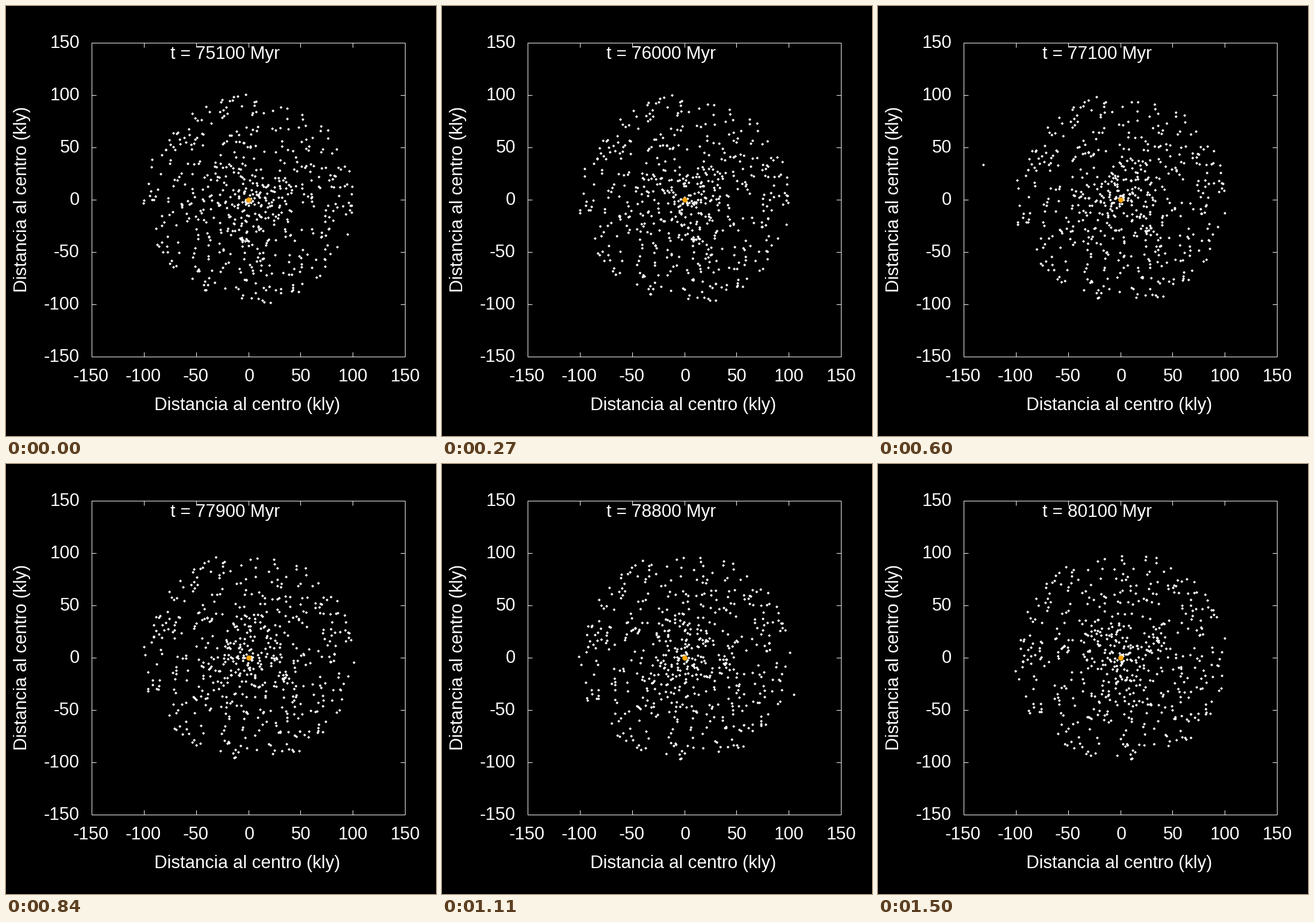
Write a matplotlib script that moves like this. It is 748 px wide and 748 px high and loops after 1530 ms.

```python
import numpy as np
import matplotlib.pyplot as plt
from matplotlib.animation import FuncAnimation

SIZE, DPI = 748, 88
PX = 72 / DPI                       # one pixel in points
LEFT, RIGHT, TOP, BOTTOM = 149, 694, 64, 610
CX, CY = 422, 337
KLY = 1.82                          # pixels per kly
FRAMES, STEP_MS = 51, 30
STARS = 570
FONT = dict(family="Liberation Sans", size=31 * PX, color="white")

# Ejected stars: first step, x and y at that step, velocity per step
EJECTED = [(3, 421, 337, -14, -3.6), (20, 440, 303, 10.1, 5.75)]


def make_disc():
    """Radius (pixels) and starting angle of every orbiting star."""
    rng = np.random.default_rng(12)
    radius = 1.5 + 99.5 * rng.random(STARS) ** 0.75
    return radius * KLY, rng.uniform(0, 2 * np.pi, STARS)


def star_positions(n):
    # Keplerian rotation with a slight outward drift
    omega = np.radians(0.576) * (185.5 / radius) ** 1.5
    phi = angle + omega * n
    r = radius * (1 + 0.0002 * n)
    x, y = CX + r * np.cos(phi), CY - r * np.sin(phi)
    for start, x0, y0, vx, vy in EJECTED:
        ex, ey = x0 + vx * (n - start), y0 + vy * (n - start)
        if n >= start and LEFT < ex < RIGHT:
            x, y = np.append(x, ex), np.append(y, ey)
    return np.round(x), np.round(y)


def line(xs, ys):
    # Whole coordinates snap to the centre of their pixel
    ax.plot(xs, ys, color="white", lw=PX, snap=True,
            solid_capstyle="butt", solid_joinstyle="miter")


def draw_plot():
    line([LEFT, RIGHT, RIGHT, LEFT, LEFT], [TOP, TOP, BOTTOM, BOTTOM, TOP])
    for value in range(-150, 151, 50):
        tx = round(421.5 + value * 1.818)
        ty = round(CY - value * KLY)
        if abs(value) < 150:
            line([tx, tx], [TOP, TOP + 8])
            line([tx, tx], [BOTTOM, BOTTOM - 8])
            line([LEFT, LEFT + 8], [ty, ty])
            line([RIGHT, RIGHT - 8], [ty, ty])
        shift = -1 if value < 0 else 1
        ax.text(tx + shift, 653, str(value), ha="center", **FONT)
        ax.text(128, ty + 9, str(value), ha="right", **FONT)
    name = "Distancia al centro (kly)"
    ax.text(420, 703, name, ha="center", **FONT)
    ax.text(36, 336, name, ha="center", va="baseline", rotation=90,
            rotation_mode="anchor", **FONT)


fig = plt.figure(figsize=(SIZE / DPI, SIZE / DPI), dpi=DPI, facecolor="black")
ax = fig.add_axes([0, 0, 1, 1])
ax.set_xlim(0, SIZE)
ax.set_ylim(SIZE, 0)
ax.axis("off")

radius, angle = make_disc()
draw_plot()
stars, = ax.plot([], [], "D", color="white", ms=3.6 * PX, mew=0, zorder=3)
ax.plot(CX, CY, "o", color="#ffa500", ms=9 * PX, mew=0, zorder=4)
clock = ax.text(381, 92, "", ha="center", zorder=5, **FONT)


def update(n):
    stars.set_data(*star_positions(n))
    clock.set_text(f"t = {75100 + 100 * n} Myr")
    return stars, clock


anim = FuncAnimation(fig, update, frames=FRAMES, interval=STEP_MS,
                     repeat=True, repeat_delay=0)
plt.show()
```
